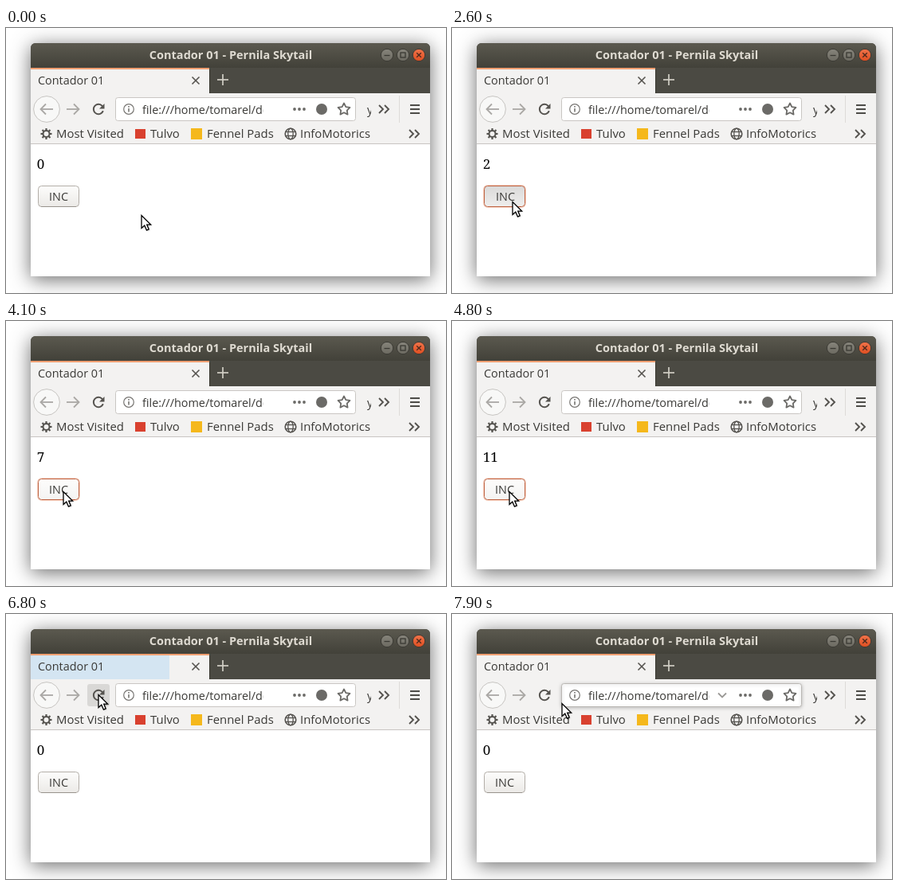
An HTML page with a canvas that plays this animation: 552 by 333 pixels, repeating every 8 s.

```html
<!DOCTYPE html>
<html lang="es">
<head>
<meta charset="utf-8">
<title>Contador 01</title>
<style>
html, body { margin: 0; width: 100%; height: 100%; overflow: hidden; background: #fff; }
canvas { display: block; width: 552px; height: 333px; }
</style>
</head>
<body>
<canvas id="stage"></canvas>
<script>
const W = 552, H = 333, LOOP = 8000, TICK = 100;
const RELOAD = 6600, HOLD = 100;
const SANS = '"Open Sans", "Noto Sans", sans-serif';
const SERIF = '"Noto Serif", "Liberation Serif", serif';
const INK = '#3a3936', ICON = '#55534f', PALE = '#aaa8a5';
const canvas = document.getElementById('stage');
const ctx = canvas.getContext('2d');
const dpr = window.devicePixelRatio || 1;
canvas.width = W * dpr;
canvas.height = H * dpr;

// Pointer key points: time, x, y
const path = [
  [500, 170, 235], [600, 158, 242], [800, 115, 226], [1000, 87, 215],
  [1700, 81, 210], [1900, 81, 210], [2200, 84, 225], [2800, 72, 214],
  [5200, 72, 214], [5600, 165, 184], [5700, 158, 172], [6000, 129, 117],
  [6400, 116, 101], [7700, 116, 101], [7900, 138, 112]
];
const run = (from, every, times) => Array.from({ length: times }, (_, i) => from + i * every);
const clicks = [...run(1300, 300, 2), ...run(2600, 300, 2), ...run(3400, 300, 4), ...run(4500, 100, 3)];

const between = (v, a, b) => v >= a && v < b;
const within = (p, x, y, w, h) => between(p.x, x, x + w) && between(p.y, y, y + h);
const mix = (a, b, k) => Math.round(a + (b - a) * k);

function pointerAt(t) {
  const next = path.find(k => k[0] >= t) || path[path.length - 1];
  const prev = path[Math.max(0, path.indexOf(next) - 1)];
  const k = Math.min(1, Math.max(0, (t - prev[0]) / (next[0] - prev[0] || 1)));
  return { x: mix(prev[1], next[1], k), y: mix(prev[2], next[2], k) };
}

function stateAt(time) {
  const t = Math.floor(time / TICK) * TICK;
  const p = pointerAt(t);
  return {
    p,
    count: t < RELOAD ? clicks.filter(c => c + HOLD <= t).length : 0,
    pressed: clicks.some(c => between(t, c, c + HOLD)),
    focused: between(t, clicks[0], RELOAD),
    overButton: within(p, 40, 198, 52, 27),
    overReload: within(p, 102, 88, 28, 28),
    reloadDown: between(t, RELOAD - HOLD, RELOAD),
    overMenu: within(p, 39, 117, 114, 28),
    overUrl: within(p, 137, 87, 302, 30),
    burst: between(t, RELOAD, 7000) ? Math.min(224, (t - RELOAD) * 0.87) : 0,
    tip: between(t, 7400, 7800)
  };
}

function rect(x, y, w, h, fill) {
  ctx.fillStyle = fill;
  ctx.fillRect(x, y, w, h);
}

function paint(fill, stroke, width = 1) {
  if (fill) { ctx.fillStyle = fill; ctx.fill(); }
  if (stroke) { ctx.strokeStyle = stroke; ctx.lineWidth = width; ctx.stroke(); }
}

function box(x, y, w, h, r, fill, stroke) {
  ctx.beginPath();
  ctx.roundRect(x, y, w, h, r);
  paint(fill, stroke);
}

function disc(x, y, r, fill, stroke, width) {
  ctx.beginPath();
  ctx.arc(x, y, r, 0, Math.PI * 2);
  paint(fill, stroke, width);
}

function line(color, width, ...pts) {
  ctx.beginPath();
  for (let i = 0; i < pts.length; i += 2) ctx.lineTo(pts[i], pts[i + 1]);
  paint(null, color, width);
}

function text(str, x, y, size, color, align = 'left', family = SANS, weight = 400) {
  ctx.font = `${weight} ${size}px ${family}`;
  ctx.textAlign = align;
  ctx.fillStyle = color;
  ctx.fillText(str, x, y);
}

function fade(y0, y1, top, bottom) {
  const g = ctx.createLinearGradient(0, y0, 0, y1);
  g.addColorStop(0, top);
  g.addColorStop(1, bottom);
  return g;
}

function shadow(color, blur, dy, dx = 0) {
  ctx.shadowColor = color;
  ctx.shadowBlur = blur * dpr;
  ctx.shadowOffsetX = dx * dpr;
  ctx.shadowOffsetY = dy * dpr;
}

function scoped(draw) {
  ctx.save();
  draw();
  ctx.restore();
}

function clippedText(str, x, y, left, right) {
  scoped(() => {
    ctx.beginPath();
    ctx.rect(left, y - 20, right - left, 30);
    ctx.clip();
    text(str, x, y, 14.4, INK);
  });
}

function cross(x, y, r, color, width) {
  line(color, width, x - r, y - r, x + r, y + r);
  line(color, width, x - r, y + r, x + r, y - r);
}

function chevrons(x, y) {
  for (const dx of [0, 7]) line(ICON, 1.9, x + dx, y - 5, x + dx + 5, y, x + dx, y + 5);
}

function arrow(x, y, dir) {
  line(PALE, 1.8, x - dir * 8, y, x + dir * 7, y);
  line(PALE, 1.8, x + dir, y - 6.5, x + dir * 7.5, y, x + dir, y + 6.5);
}

function frame() {
  scoped(() => {
    shadow('rgba(0,0,0,.58)', 25, 4);
    box(31, 19, 501, 293, [6, 6, 0, 0], '#4a4942');
  });
  box(31, 19, 501, 31, [6, 6, 0, 0], fade(19, 50, '#5b594f', '#424139'));
  text('Contador 01 - Pernila Skytail', 282, 39, 14.5, '#dfdbd2', 'center', SANS, 700);

  for (const x of [478, 498]) disc(x, 34, 7.7, fade(26, 42, '#87857c', '#6b6960'), '#3a3933');
  line('#3a3933', 1.3, 474.5, 34.5, 481.5, 34.5);
  ctx.strokeRect(495, 31, 6, 6);
  disc(518, 34, 7.7, fade(26, 42, '#f0744b', '#df4e20'), '#3a3933');
  cross(518, 34, 2.8, '#4f2a1e', 1.4);
}

function tabs(s) {
  rect(31, 50, 501, 32, '#4b4a43');
  rect(31, 50, 224, 32, '#f3f2f1');
  rect(31, 52, s.burst, 30, '#d4e5f2');
  rect(31, 50, 224, 2, '#ef9f72');
  rect(255, 52, 1, 30, '#37362f');
  text('Contador 01', 40, 71, 14.4, INK);
  cross(238, 66, 4.5, ICON, 1.6);
  line('#d2cfc6', 1.7, 265, 65, 279, 65);
  line('#d2cfc6', 1.7, 272, 58, 272, 72);
}

function reload(s) {
  if (s.overReload) box(102, 88, 28, 28, 3, s.reloadDown ? '#c9c8c6' : '#d9d8d6');
  ctx.beginPath();
  ctx.arc(116, 102, 6.2, 0.35, Math.PI * 1.78);
  paint(null, ICON, 2);
  ctx.beginPath();
  ctx.moveTo(123.5, 95);
  ctx.lineTo(123.5, 101.5);
  ctx.lineTo(117, 101.5);
  paint(ICON);
}

function star(x, y) {
  ctx.beginPath();
  for (let i = 0; i < 10; i++) {
    const a = -Math.PI / 2 + i * Math.PI / 5, r = i % 2 ? 4 : 7.8;
    ctx.lineTo(x + r * Math.cos(a), y + r * Math.sin(a));
  }
  ctx.closePath();
  ctx.lineJoin = 'round';
  paint(null, '#6b6a67', 1.8);
  ctx.lineJoin = 'miter';
}

function toolbar(s) {
  rect(31, 82, 501, 63, '#f3f2f1');
  disc(51, 102, 16.4, '#f8f8f7', '#c6c4c1');
  arrow(51, 102, -1);
  arrow(84, 102, 1);
  reload(s);

  scoped(() => {
    if (s.overUrl) shadow('rgba(0,0,0,.22)', 4, 1);
    box(137.5, 87.5, 301, 29, 3, '#fff', s.overUrl ? '#bab7b3' : '#c9c6c3');
  });
  disc(154, 102, 6.3, null, '#777572', 1.2);
  rect(153.2, 98, 1.6, 1.7, '#777572');
  rect(153.2, 101, 1.6, 4.5, '#777572');
  clippedText('file:///home/tomarel/demos', 171, 107.5, 168, 322.5);
  if (s.overUrl) line('#9b9996', 1.8, 334, 99.5, 339, 104.5, 344, 99.5);
  for (const x of [362, 368, 374]) disc(x, 102, 1.9, '#6b6a67');
  disc(396, 102, 7, '#6b6a67');
  star(424, 102.3);

  clippedText('y', 453, 107.5, 453, 458);
  chevrons(468, 102);
  rect(493, 85, 1, 34, '#dddbd8');
  for (const y of [97, 102, 107]) line(INK, 1.8, 507, y, 519, y);
}

function gear(x, y) {
  for (let a = 0; a < 6; a += Math.PI / 4) {
    const c = Math.cos(a), d = Math.sin(a);
    line(ICON, 2.2, x + 4 * c, y + 4 * d, x + 7 * c, y + 7 * d);
  }
  disc(x, y, 4, null, ICON, 2);
}

function globe(x, y) {
  disc(x, y, 6.8, null, ICON, 1.6);
  ctx.beginPath();
  ctx.ellipse(x, y, 3.2, 6.8, 0, 0, Math.PI * 2);
  paint(null, ICON, 1.3);
  for (const dy of [-2.5, 2.5]) line(ICON, 1.3, x - 6.3, y + dy, x + 6.3, y + dy);
}

function bookmarks(s) {
  if (s.overMenu) box(39, 122, 114, 21, 3, '#d9d8d6');
  gear(50.5, 133);
  rect(162, 127, 13, 12, '#d9412f');
  rect(232, 126, 14, 14, '#f5b81c');
  globe(357, 133);
  const items = [['Most Visited', 63], ['Tulvo', 181], ['Fennel Pads', 252], ['InfoMotorics', 369]];
  for (const [name, x] of items) text(name, x, 138, 14.9, INK);
  chevrons(506, 133);
  rect(31, 145, 501, 1, '#c8c5c2');
}

function page(s) {
  rect(31, 146, 501, 166, '#fff');
  text(s.count, 38.7, 177, 17, '#000', 'left', SERIF);

  if (s.focused && s.overButton) box(39.5, 197.5, 53, 28, 5, null, 'rgba(240,150,110,.4)');
  const fill = s.pressed ? ['#dad9d8', '#efeeed']
    : s.overButton ? ['#fdfdfc', '#f4f3f2'] : ['#fdfdfc', '#ebe9e6'];
  const edge = !s.focused ? '#b3aea8' : s.overButton ? '#bd6242' : '#c98a72';
  box(40.5, 198.5, 51, 26, 4, fade(198, 225, ...fill), edge);
  if (!s.focused) line('#98938d', 1, 44, 224.5, 88, 224.5);
  text('INC', s.pressed ? 67 : 66, 217, 14.4, INK, 'center');
}

function tooltip() {
  box(117, 123, 214, 27, 3, '#2b2a28');
  text('Reload current page (Ctrl+R)', 224, 141.5, 14, '#fff', 'center');
}

function pointer({ x, y }) {
  scoped(() => {
    ctx.translate(x, y + 0.5);
    ctx.beginPath();
    for (const [px, py] of [[0, 0], [0, 16], [3.8, 12.6], [6.4, 18.6], [9.2, 17.4], [6.7, 11.6], [11.6, 11.6]])
      ctx.lineTo(px, py);
    ctx.closePath();
    shadow('rgba(0,0,0,.3)', 2, 1, 1);
    paint('#fff');
    ctx.shadowColor = 'transparent';
    paint(null, '#000', 1.3);
  });
}

function draw(t) {
  const s = stateAt(t);
  ctx.setTransform(dpr, 0, 0, dpr, 0, 0);
  rect(0, 0, W, H, '#fff');
  frame();
  tabs(s);
  toolbar(s);
  bookmarks(s);
  page(s);
  if (s.tip) tooltip();
  pointer(s.p);
}

const start = performance.now();
function tick() {
  draw((performance.now() - start) % LOOP);
  requestAnimationFrame(tick);
}
tick();
</script>
</body>
</html>
```
